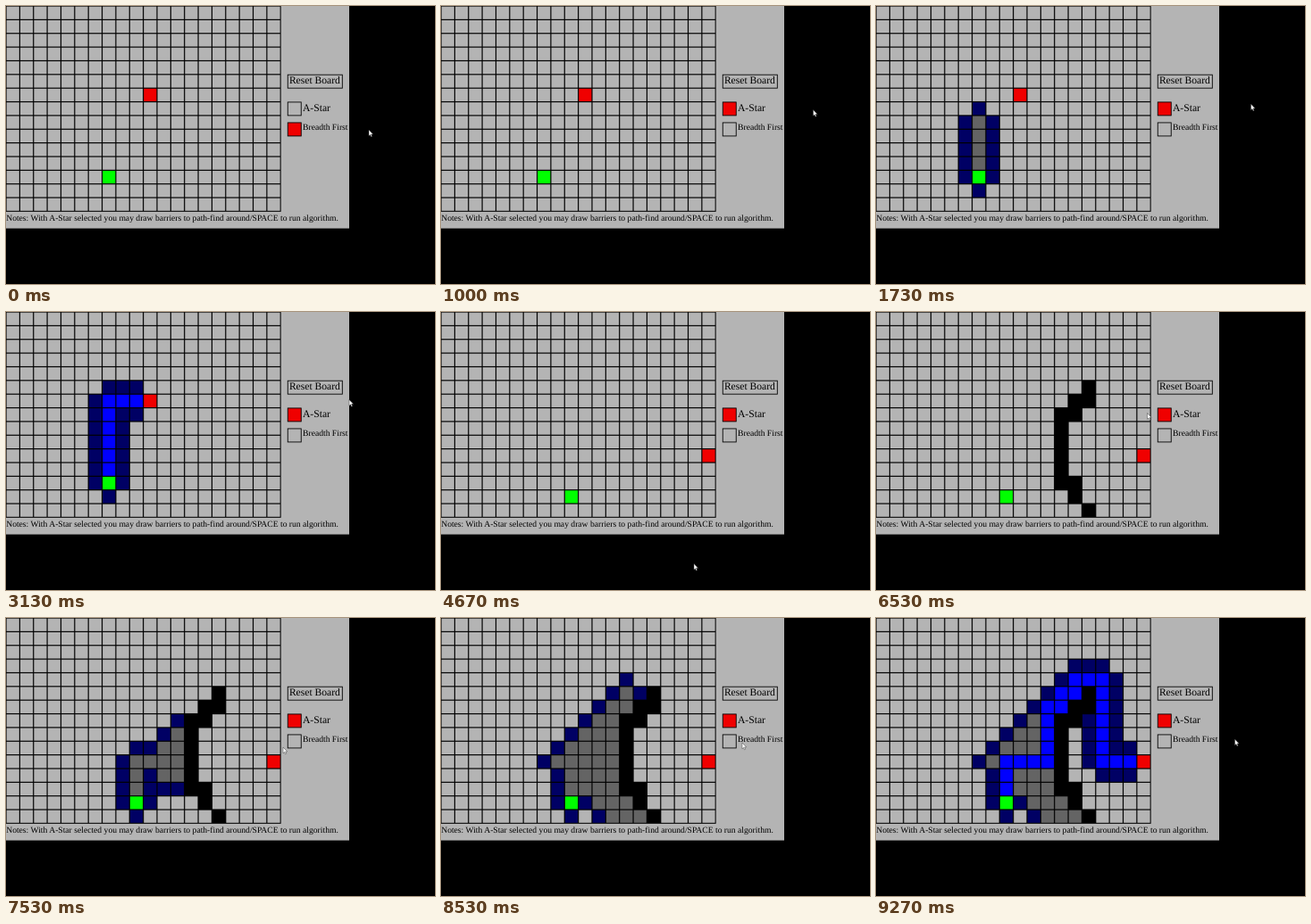
An HTML page for the animation above (9.34 s loop, 480 by 312 pixels).

```html
<!DOCTYPE html>
<html lang="en">
<head>
<meta charset="utf-8">
<title>Path finding board</title>
<style>
  html, body { margin: 0; width: 100%; height: 100%; overflow: hidden; background: #000; }
  svg { display: block; width: 480px; height: 312px; }
  text { font-family: "Liberation Serif", "Times New Roman", serif; fill: #000;
         text-rendering: geometricPrecision; }
  .box { stroke: #000; stroke-width: 1.15; }
</style>
</head>
<body>
<svg viewBox="0 0 480 312">
  <g transform="scale(.768)">
    <rect width="500" height="325" fill="#b4b4b4"/>
    <rect width="400.6" height="300.6" fill="#000"/>
    <g id="grid"></g>
    <rect class="box" x="410.5" y="100.5" width="79.5" height="19.5" fill="none"/>
    <rect class="box" id="astar" x="410.5" y="140.5" width="19.5" height="19.5"/>
    <rect class="box" id="breadth" x="410.5" y="170.5" width="19.5" height="19.5"/>
  </g>
  <text x="316.9" y="87.3" font-size="11.6">Reset Board</text>
  <text x="332" y="118.2" font-size="11.6">A-Star</text>
  <text x="332" y="139.2" font-size="9.65">Breadth First</text>
  <text x="0.2" y="241.3" font-size="9.62">Notes: With A-Star selected you may draw barriers to path-find around/SPACE to run algorithm.</text>
  <path id="cursor" d="M0 0V6.8L1.5 5.4L2.5 7.8L3.6 7.3L2.6 4.9H4.7Z" fill="#fff" stroke="#333" stroke-width=".45"/>
</svg>
<script>
const LOOP = 9340, COLS = 20, ROWS = 15, CELL = 15.36;
const STEP = 50;        // ms per search step
const SELECT = 400, RESET = 3400;
const DRAW = 5760, STROKE = 58; // barrier start, ms per barrier cell
const C = { empty: '#b4b4b4', wall: '#000', start: '#0f0', end: '#f00000',
            open: '#000064', closed: '#646464', path: '#0000ff' };
const $ = id => document.getElementById(id);
const key = (x, y) => y * COLS + x;

// Barrier drawn upwards from the bottom row: Up, Left, Right, Diagonal up-left
const walls = [[15, 14]];
for (const m of 'DULUUUUURURU') {
  const [x, y] = walls[walls.length - 1];
  walls.push([x + (m === 'R') - (m === 'L' || m === 'D'), y - (m === 'U' || m === 'D')]);
}

// Nearest-to-goal search; notes the step at which each cell opens and closes
function search(start, end, blocked) {
  const dist = ([x, y]) => Math.abs(x - end[0]) + Math.abs(y - end[1]);
  const opened = new Map([[key(...start), 0]]), closed = new Map();
  const parent = new Map(), queue = [start];
  let step = 0;
  while (queue.length) {
    let best = 0;
    queue.forEach((c, i) => { if (dist(c) < dist(queue[best])) best = i; });
    const [x, y] = queue.splice(best, 1)[0], k = key(x, y);
    if (!dist([x, y])) break;
    closed.set(k, step);
    for (const [dx, dy] of [[0, -1], [0, 1], [1, 0], [-1, 0]]) {
      const nx = x + dx, ny = y + dy, n = key(nx, ny);
      if (nx < 0 || ny < 0 || nx >= COLS || ny >= ROWS) continue;
      if (opened.has(n) || blocked.has(n)) continue;
      opened.set(n, step);
      parent.set(n, k);
      queue.push([nx, ny]);
    }
    step++;
  }
  const path = new Set();
  for (let k = key(...end); k !== undefined; k = parent.get(k)) path.add(k);
  return { opened, closed, path, done: step };
}

function board(start, end, begin, barrier) {
  const blocked = barrier.map(c => key(...c));
  return { start: key(...start), end: key(...end), begin, blocked,
           ...search(start, end, new Set(blocked)) };
}
const first = board([7, 12], [10, 6], 1510, []);
const second = board([9, 13], [19, 10], 6955, walls);

// Pointer moves: from, to (ms), target x, y; it rests in between
const centre = ([x, y]) => [(x + .5) * CELL, (y + .5) * CELL];
const moves = [
  [560, 1130, 419.5, 110],
  [2880, RESET, 346, 86], [RESET, 3800, 295, 193], [3800, 4470, 283, 282.5],
  [4880, 5130, 294, 260], [5130, 5330, 304, 280], [5420, DRAW, ...centre(walls[0])],
  ...walls.slice(1).map((c, i) => [DRAW + i * STROKE, DRAW + (i + 1) * STROKE, ...centre(c)]),
  [6470, 6530, 303.5, 113.5],
  [6740, 7530, 310, 145], [7530, 8530, 336.7, 140], [8530, 8730, 391, 138], [8730, 9270, 401.5, 136]
];
function pointer(t) {
  let x = 406, y = 139;
  for (const [from, to, tx, ty] of moves) {
    const f = Math.min(1, Math.max(0, (t - from) / (to - from)));
    x += (tx - x) * f;
    y += (ty - y) * f;
  }
  return [x, y];
}

const cells = Array.from({ length: COLS * ROWS }, (_, k) => {
  const r = document.createElementNS('http://www.w3.org/2000/svg', 'rect');
  const at = { x: k % COLS * 20 + .8, y: Math.floor(k / COLS) * 20 + .8, width: 18.45, height: 18.45 };
  for (const a in at) r.setAttribute(a, at[a]);
  $('grid').append(r);
  return r;
});

function colour(b, k, step, drawn) {
  if (k === b.start) return C.start;
  if (k === b.end) return C.end;
  if (drawn.includes(k)) return C.wall;
  if (step >= b.done && b.path.has(k)) return C.path;
  if (b.closed.get(k) <= step) return C.closed;
  if (b.opened.get(k) <= step) return C.open;
  return C.empty;
}

function draw(t) {
  const b = t < RESET ? first : second;
  const step = Math.floor((t - b.begin) / STEP);
  const drawn = b.blocked.slice(0, Math.max(0, Math.floor((t - DRAW) / STROKE) + 1));
  cells.forEach((r, k) => r.setAttribute('fill', colour(b, k, step, drawn)));
  const star = t >= SELECT;
  $('astar').setAttribute('fill', star ? C.end : C.empty);
  $('breadth').setAttribute('fill', star ? C.empty : C.end);
  $('cursor').setAttribute('transform', `translate(${pointer(t)})`);
}

const origin = performance.now();
function tick() {
  draw((performance.now() - origin) % LOOP);
  requestAnimationFrame(tick);
}
tick();
</script>
</body>
</html>
```
